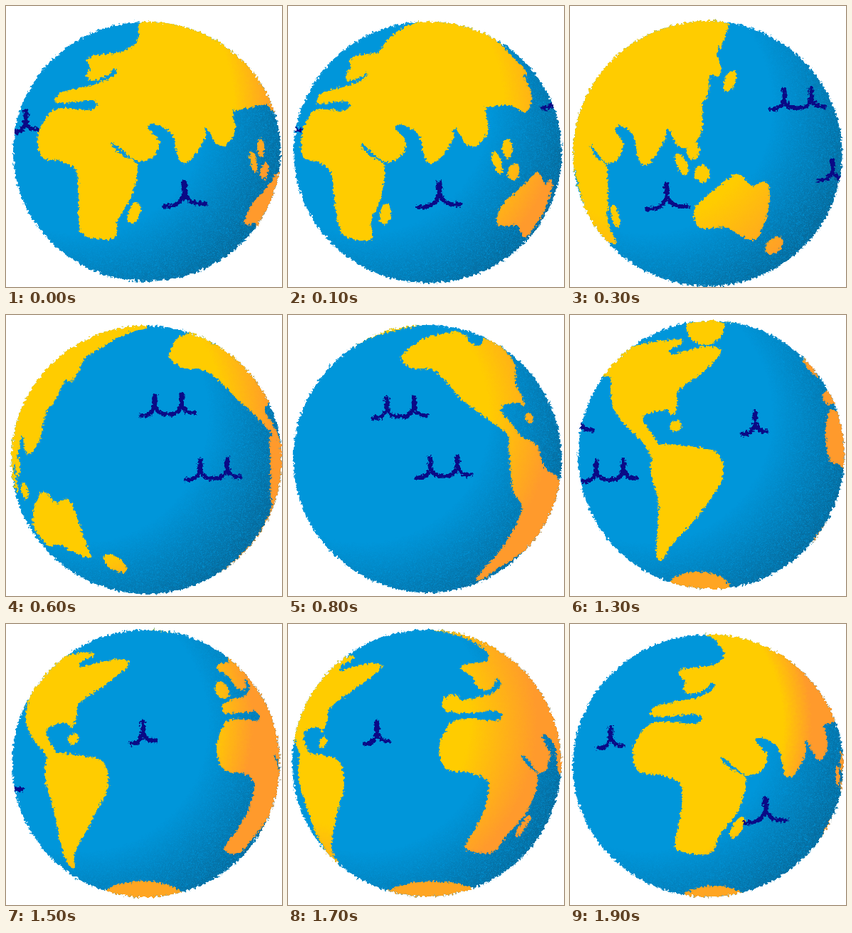
Write an HTML page that moves like this. It is 388 px wide and 394 px high and loops after 2000 ms.

```html
<!DOCTYPE html>
<html lang="en">
<head>
<meta charset="utf-8">
<title>Turning globe</title>
<style>
html, body { margin: 0; width: 100%; height: 100%; overflow: hidden; background: #fff; }
svg { display: block; width: 100vw; height: 100vh; }
.wave { fill: none; stroke: #0a0a86; stroke-width: 5.6; stroke-linecap: round; stroke-linejoin: round; }
.land { fill: url(#soil); }
</style>
</head>
<body>
<svg viewBox="0 0 388 394">
  <defs>
    <filter id="rough" filterUnits="userSpaceOnUse" x="0" y="0" width="388" height="394" color-interpolation-filters="sRGB">
      <feTurbulence id="noise" type="fractalNoise" baseFrequency=".28" numOctaves="2" result="n"/>
      <feDisplacementMap in="SourceGraphic" in2="n" scale="8" xChannelSelector="R" yChannelSelector="G"/>
    </filter>
    <filter id="grain" filterUnits="userSpaceOnUse" x="0" y="0" width="388" height="394" color-interpolation-filters="sRGB">
      <feTurbulence type="fractalNoise" baseFrequency=".7" numOctaves="2"/>
      <feColorMatrix values="0 0 0 0 0  0 0 0 0 0  0 0 0 0 0  2 0 0 0 -.15" result="g"/>
      <feComposite in="SourceGraphic" in2="g" operator="in"/>
    </filter>
    <radialGradient id="shade" gradientUnits="userSpaceOnUse" cx="105" cy="140" r="315">
      <stop offset=".57" stop-color="#07618f" stop-opacity="0"/>
      <stop offset="1" stop-color="#07618f"/>
    </radialGradient>
    <radialGradient id="soil" gradientUnits="userSpaceOnUse" cx="105" cy="140">
      <stop id="sunny" stop-color="#fc0"/>
      <stop offset="1" stop-color="#ff9a2c"/>
    </radialGradient>
    <clipPath id="disc"><ellipse id="globe"/></clipPath>
  </defs>
  <g filter="url(#rough)">
    <g id="world" clip-path="url(#disc)">
      <rect width="100%" height="100%" fill="#0096da"/>
      <rect width="100%" height="100%" fill="url(#shade)" filter="url(#grain)"/>
      <ellipse id="pole" fill="#ffa522" ry="26"/>
    </g>
  </g>
</svg>
<script>
const STEP = 100, STEPS = 20, RAD = Math.PI / 180;
const $ = id => document.getElementById(id);
const set = (el, attrs) => { for (const k in attrs) el.setAttribute(k, attrs[k]); };
const range = (n, f) => Array.from({ length: n }, (_, i) => f(i));

// Globe rows: step, cx, cy, rx, ry, radii where land turns orange
const globe = [
  [0, 198, 204, 188, 182, 215, 275],
  [3, 193.5, 207, 189, 186, 165, 290],
  [6, 197.5, 203, 190, 188, 200, 270],
  [10, 194.5, 200, 187, 187, 155, 265],
  [13, 198.5, 196, 187, 188, 218, 240],
  [17, 195, 195, 189, 187, 150, 245],
  [19, 194, 198.5, 190, 184, 195, 235]
];
globe.push([STEPS, ...globe[0].slice(1)]);

// Values of a keyed track at a step, or null outside it
function along(track, step) {
  const t = step < track[0][0] ? step + STEPS : step;
  const i = track.findIndex(r => r[0] > t);
  if (i < 1) return null;
  const a = track[i - 1], b = track[i], u = (t - a[0]) / (b[0] - a[0]);
  return range(Math.max(a.length, b.length), k => (a[k] || 0) + ((b[k] || 0) - (a[k] || 0)) * u).slice(1);
}

const halfWidth = v => Math.sqrt(Math.max(0, 1 - v * v)) + .03;
const clamp = (v, m) => Math.max(-m, Math.min(m, v));
function toSphere([x, y], [cx, cy, rx, ry]) {
  const v = (y - cy) / ry;
  return [Math.asin(clamp((x - cx) / rx / halfWidth(v), 1)) / RAD, v];
}
function toStage(lon, v, [cx, cy, rx, ry]) {
  const x = cx + rx * halfWidth(v) * Math.sin(clamp(lon, 90) * RAD);
  return x.toFixed(1) + ' ' + (cy + ry * v).toFixed(1);
}

const coast = text => text.split(' ').map(p => p.split(',').map(Number));
const isle = (x, y, rx, ry, tilt = 0) => range(10, i => {
  const c = rx * Math.cos(i * 36 * RAD), s = ry * Math.sin(i * 36 * RAD);
  const ct = Math.cos(tilt * RAD), st = Math.sin(tilt * RAD);
  return [x + c * ct - s * st, y + c * st + s * ct];
});

// Closed curve through the points, sampled densely
function smooth(pts) {
  const n = pts.length, at = i => pts[(i + n) % n];
  const tangent = (i, len) => {
    const a = at(i - 1), b = at(i + 1), dx = b[0] - a[0], dy = b[1] - a[1];
    const k = len * .27 / (Math.hypot(dx, dy) || 1);
    return [dx * k, dy * k];
  };
  return pts.flatMap((a, i) => {
    const b = at(i + 1), len = Math.hypot(b[0] - a[0], b[1] - a[1]);
    const s = tangent(i, len), e = tangent(i + 1, len), m = Math.ceil(len / 5);
    return range(m, j => {
      const t = j / m, r = 1 - t;
      return [0, 1].map(c => r * r * r * a[c] + 3 * r * r * t * (a[c] + s[c])
        + 3 * r * t * t * (b[c] - e[c]) + t * t * t * b[c]);
    });
  });
}

function addPath(name) {
  const el = document.createElementNS('http://www.w3.org/2000/svg', 'path');
  set(el, { class: name });
  $('world').append(el);
  return el;
}

// Land is outlined as seen at step `at`; track rows: step, turn in degrees, drop
const lands = [], waves = [];
function land(at, track, ...outlines) {
  const disc = along(globe, at);
  const rings = outlines.map(o => smooth(o).map(p => toSphere(p, disc)));
  lands.push({ el: addPath('land'), track, rings });
}

// Africa, Europe and southern Asia
land(0, [[10, 170], [13, 110], [17, 58], [19, 20], [20, 0], [23, -43], [26, -91], [28, -130]],
  coast('192,10 184,50 163,64 121,70 113,76 118,87 113,98 120,105 143,97 154,88 152,97 125,110 75,122 69,135 122,133 129,139 118,146 80,143 62,149 45,180 50,212 78,218 99,232 104,316 120,325 152,325 157,300 176,268 184,222 160,207 149,192 170,208 187,218 207,211 216,190 200,167 232,178 249,220 280,185 280,170 296,193 308,196 322,175 312,125 284,50 222,24'),
  isle(180, 290, 8, 16, 20));
// Northern and eastern Asia
land(3, [[18, 130], [19, 107], [20, 85], [23, 0], [26, -47], [30, -120]],
  coast('221,10 218,45 206,68 212,85 209,99 197,97 194,125 165,150 140,140 -5,140 -5,10'));
// Australia and the Pacific islands
land(3, [[17, 130], [19, 80], [20, 62], [23, 0], [26, -62, .08], [28, -110]],
  coast('176,282 174,296 182,311 220,311 246,325 262,327 278,290 281,262 275,246 256,252 240,237 230,237 195,264'),
  isle(225, 105, 8, 16, 20), isle(173, 202, 9, 14), isle(157, 222, 7, 17, -25),
  isle(186, 235, 11, 12), isle(287, 336, 10, 15, 45));
// North America
land(10, [[3, 130], [6, 62], [10, 0], [13, -35, .09], [17, -69, .15], [19, -110]],
  coast('98,66 103,55 145,32 205,22 212,28 205,36 213,43 240,32 258,36 267,50 264,70 246,97 251,108 250,128 240,121 212,126 206,133 222,152 236,172 232,190 208,163 180,143 148,115 130,80 120,74 104,74'),
  isle(256, 143, 8, 8));
// South America, seen from the west and then from the east
land(10, [[4, 90], [6, 53], [10, 0], [12, -35]],
  coast('230,168 258,172 280,182 295,212 335,228 364,255 345,290 295,330 255,355 243,370 230,368 229,355 246,315 258,275 255,262 240,250 231,225'));
land(13, [[12, 16], [13, 0], [17, -42], [19, -100]],
  coast('119,185 135,181 190,187 208,194 215,210 212,235 175,288 140,325 132,342 122,341 124,262 114,225 114,205'));
// Greenland and Britain
land(13, [[11, 40], [13, 0], [15, -60]], isle(190, 16, 27, 26));
land(17, [[13, 59, -.2], [17, 0], [18, -15]], isle(230, 111, 14, 12, -25));

// Wave rows: step, x, y
const wave = (loops, w, h, track) => waves.push({ el: addPath('wave'), loops, w, h, track });
wave(1, 34, 29, [[8, 395, 142], [10, 342, 142], [13, 243, 138], [17, 108, 139], [19, 40, 145], [20, 11, 148], [22, -45, 150]]);
wave(1, 58, 33, [[17, 395, 248], [19, 246, 246], [20, 222, 248], [23, 107, 252], [26, -60, 250]]);
wave(2, 76, 27, [[0, 395, 115], [3, 282, 118], [6, 190, 114], [10, 50, 121], [13, -44, 138], [15, -99, 140]]);
wave(2, 76, 27, [[0, 440, 220], [3, 350, 217], [6, 254, 204], [10, 108, 198], [13, 18, 206], [16, -90, 210]]);

// Looping pen line
const scribble = ({ loops, w, h }, x, y) => 'M' + range(30 * loops + 1, i => {
  const s = i / 30 / loops, p = i * 12 * RAD;
  const lift = Math.pow((1 - Math.cos(p)) / 2, 1.5);
  return (x + w * (s + .21 * Math.sin(p) / loops)).toFixed(1) + ' ' + (y + h * (1 - lift) - 4 * s).toFixed(1);
}).join('L');

// Southern ice rows: step, cx, cy, rx
const ice = [[8, 190, 420, 30], [10, 198, 396, 40], [13, 180, 386, 46], [17, 204, 387, 72], [19, 203, 393, 50], [20, 203, 415, 40]];

function draw(step) {
  const [cx, cy, rx, ry, near, far] = along(globe, step);
  const disc = [cx, cy, rx, ry];
  set($('globe'), { cx, cy, rx, ry });
  set($('soil'), { r: far });
  set($('sunny'), { offset: near / far });
  set($('noise'), { seed: step + 1 });

  for (const { el, track, rings } of lands) {
    const pos = along(track, step);
    const [turn, drop = 0] = pos || [];
    set(el, { d: pos ? rings.map(r => 'M' + r.map(([lon, v]) => toStage(lon + turn, v + drop, disc)).join('L') + 'Z').join('') : '' });
  }
  for (const w of waves) {
    const pos = along(w.track, step);
    set(w.el, { d: pos ? scribble(w, ...pos) : '' });
  }
  const cap = along(ice, step);
  $('pole').style.display = cap ? '' : 'none';
  if (cap) set($('pole'), { cx: cap[0], cy: cap[1], rx: cap[2] });
}

let shown = -1;
function tick() {
  const step = Math.floor(performance.now() / STEP) % STEPS;
  if (step !== shown) draw(shown = step);
  requestAnimationFrame(tick);
}
tick();
</script>
</body>
</html>
```
